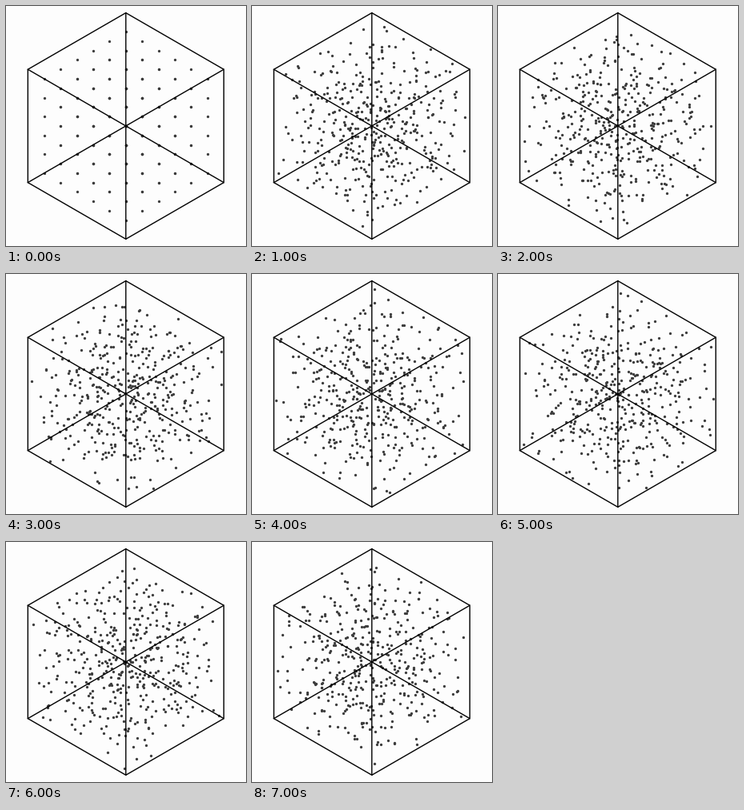
These frames come from a looping animation (300x300 px, 8000 ms). A matplotlib script:

```python
import itertools

import matplotlib.pyplot as plt
import numpy as np
from matplotlib.animation import FuncAnimation

SIZE, DPI = 300, 100
CENTER_X, CENTER_Y, RADIUS = 149.8, 149.95, 141.4
CELLS, PER_CELL = 6, 2
STEPS, STEP_MS = 8, 1000


def px(width):
    """Convert pixels to points."""
    return width * 72 / DPI


def project(points):
    """View unit-cube points straight along the cube's diagonal."""
    a, b, c = np.asarray(points, float).T
    x = CENTER_X + RADIUS * np.sqrt(3) / 2 * (a - b)
    y = CENTER_Y + RADIUS * ((a + b) / 2 - c)
    return x, y


def cloud(step):
    """Cell centres first, then fresh points scattered inside each cell."""
    cells = np.array(list(itertools.product(range(CELLS), repeat=3)))
    if step == 0:
        return (cells + 0.5) / CELLS
    cells = np.repeat(cells, PER_CELL, axis=0)
    rng = np.random.default_rng(40 + step)
    return (cells + rng.random(cells.shape)) / CELLS


fig = plt.figure(figsize=(SIZE / DPI, SIZE / DPI), dpi=DPI, facecolor="#fdfdfd")
ax = fig.add_axes([0, 0, 1, 1])
ax.set_xlim(0, SIZE)
ax.set_ylim(SIZE, 0)
ax.axis("off")

# Cube edges: corner pairs that differ in exactly one coordinate.
corners = list(itertools.product((0, 1), repeat=3))
for p, q in itertools.combinations(corners, 2):
    if sum(u != v for u, v in zip(p, q)) == 1:
        ax.plot(*project([p, q]), color="black", lw=px(1.4),
                solid_capstyle="round", snap=False, zorder=3)

dots, = ax.plot([], [], "o", color="#3c3c3c", ms=px(3.3), mew=0,
                snap=False, zorder=2)


def draw(step):
    dots.set_data(*project(cloud(step)))
    return dots,


anim = FuncAnimation(fig, draw, frames=STEPS, interval=STEP_MS,
                     repeat=True, repeat_delay=0)
plt.show()
```
